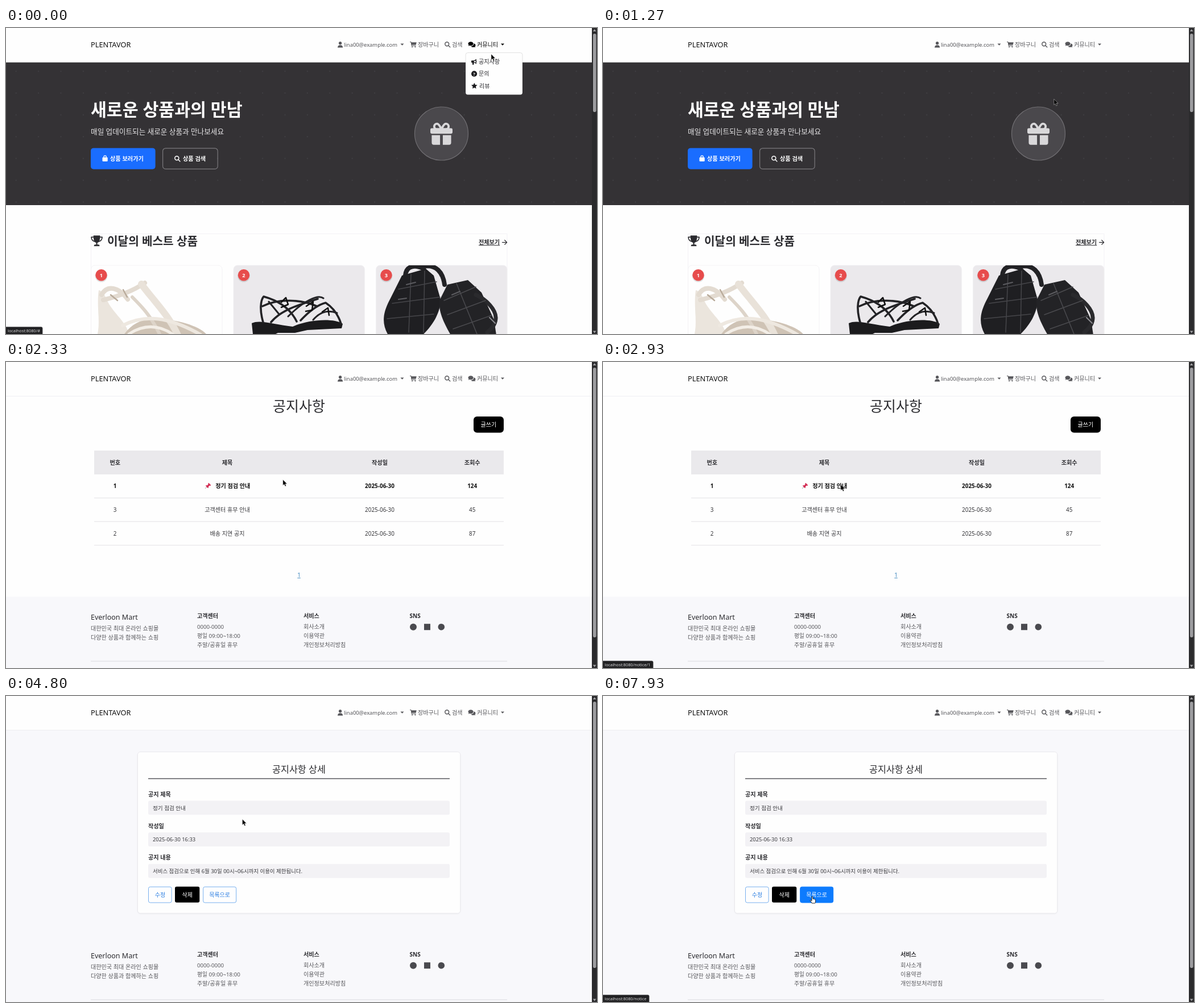
These frames come from a looping animation (1039 by 539 pixels, 8000 ms). An HTML page:

```html
<!DOCTYPE html>
<html lang="ko">
<head>
<meta charset="utf-8">
<title>Shop notices</title>
<style>
html, body { margin: 0; width: 100%; height: 100%; overflow: hidden; background: #fff; }
svg { display: block; width: 1039px; height: 539px; }
text { font-family: "Noto Sans", "Noto Sans CJK KR", "Noto Sans CJK JP", sans-serif; white-space: pre; }
</style>
</head>
<body>
<svg id="stage" viewBox="0 0 1039 539" xmlns="http://www.w3.org/2000/svg"></svg>
<script>
const INK = '#2b2b2f', GREY = '#57575b', BLUE = '#2a7de1';

// y is the visual middle of the line
const text = (x, y, s, size = 10.1, fill = GREY, weight = 400, anchor = 'start', more = '') =>
  `<text x="${x}" y="${(y + size * .385).toFixed(2)}" font-size="${size}" fill="${fill}" font-weight="${weight}" text-anchor="${anchor}" ${more}>${s}</text>`;
const mid = (x, y, s, size, fill, weight, more) => text(x, y, s, size, fill, weight, 'middle', more);
const rect = (x, y, w, h, fill, r = 0, more = '') =>
  `<rect x="${x}" y="${y}" width="${w}" height="${h}" rx="${r}" fill="${fill}" ${more}/>`;
const disc = (x, y, r, fill, more = '') => `<circle cx="${x}" cy="${y}" r="${r}" fill="${fill}" ${more}/>`;
const path = (d, fill, more = '') => `<path d="${d}" fill="${fill}" ${more}/>`;
const line = (d, color, w, more = '') =>
  path(d, 'none', `stroke="${color}" stroke-width="${w}" stroke-linecap="round" stroke-linejoin="round" ${more}`);
const group = (id, body, more = '') => `<g id="${id}" ${more}>${body}</g>`;

// icons live in a box 16 units high
const shapes = {
  user: c => disc(7, 4, 4, c) + path('M0 16C0 12 2.5 9.5 5.5 9.5H8.5C11.5 9.5 14 12 14 16Z', c),
  cart: c => line('M.7 1H3L5 11.3H15.5', c, 1.6) + path('M3.2 2H17.8L16 9H4.6Z', c) + disc(6.2, 14.4, 1.6, c) + disc(14.2, 14.4, 1.6, c),
  search: c => line('M1.2 6.5A5.3 5.3 0 1 1 11.8 6.5A5.3 5.3 0 1 1 1.2 6.5M10.6 10.6L15 15', c, 2.2),
  chat: c => path('M7 1C11 1 14 3.3 14 6.3S11 11.6 7 11.6C5.8 11.6 4.7 11.4 3.8 11L.3 12.3L1.6 9.3C.6 8.5 0 7.5 0 6.3C0 3.3 3 1 7 1Z', c)
    + path('M15.2 5.5C18 6 20 7.9 20 10.3C20 11.5 19.4 12.5 18.5 13.4L19.8 16L16.3 15C13 16.2 9.3 15.4 7.8 13C12 13 15.6 10 15.2 5.5Z', c),
  bag: c => rect(0, 5, 14, 11, c, 2) + line('M3.6 7V4A3.4 3.4 0 0 1 10.4 4V7', c, 1.7),
  gift: c => rect(0, 4, 16, 4, c, 1) + path('M1 9H7V16H2.5Q1 16 1 14.5ZM9 9H15V14.5Q15 16 13.5 16H9Z', c)
    + line('M8 4.8H4.8A2 2 0 0 1 4.8 .8C6.3 .8 7.2 3.2 8 4.8C8.8 3.2 9.7 .8 11.2 .8A2 2 0 0 1 11.2 4.8H8', c, 1.6),
  trophy: c => path('M4 0H14C14 6 13 10 9.9 11V13.6H12Q13.2 13.6 13.2 16H4.8Q4.8 13.6 6 13.6H8.1V11C5 10 4 6 4 0Z', c)
    + line('M4 2.4H.9C1 6 2.7 8.2 5.8 9M14 2.4H17.1C17 6 15.3 8.2 12.2 9', c, 1.4),
  horn: c => path('M0 5.5Q0 4 1.5 4H6C9 4 11.5 2.5 14 0V14C11.5 11.5 9 10 7 10V14.5Q7 16 5.5 16H4.5Q3 16 3 14.5V10H1.5Q0 10 0 8.5ZM14.8 5Q16.4 7 14.8 9Z', c)
    + path('M12 4V10C10.6 9.2 9.2 8.6 7.5 8.4V5.6C9.2 5.4 10.6 4.8 12 4Z', '#fff'),
  ask: c => disc(8, 8, 8, c) + mid(8, 8, '?', 12, '#fff', 700),
  star: c => path('M8 0L10.4 5.2L16 5.9L11.9 9.8L13 15.5L8 12.7L3 15.5L4.1 9.8L0 5.9L5.6 5.2Z', c)
};
const icon = (name, x, y, h, c) => `<g transform="translate(${x} ${y}) scale(${h / 16})">${shapes[name](c)}</g>`;
const caret = x => path(`M${x} 27.5H${x + 6}L${x + 3} 30.7Z`, 'currentColor');

const nav = text(149, 29.5, 'PLENTAVOR', 12.75, '#111')
  + group('links', icon('user', 583, 24, 10.5, 'currentColor') + text(594, 29.1, 'lina00@example.com', 9.4) + caret(693.5)
    + icon('cart', 710, 23.8, 10.6, 'currentColor') + text(724, 29, '장바구니')
    + icon('search', 771, 24, 10.4, 'currentColor') + text(784, 29, '검색'), `color="${GREY}"`)
  + group('talk', icon('chat', 812.5, 23.7, 10.4, 'currentColor') + text(828, 29, '커뮤니티', 10.1, 'currentColor') + caret(870));

const whiteShoe =
  path('M163 462C159 490 166 515 161 539H216C212 518 186 500 177 478C174 470 168 462 163 462Z', '#ebe5dd')
  + path('M208 539C222 520 240 512 262 512C300 513 338 524 352 539Z', '#cfc3b5')
  + line('M168 470C178 452 198 456 214 478M171 479C192 474 222 464 244 449', '#e3dbd1', 8)
  + line('M184 470L196 480M206 461L213 474', '#b9ab9b', 2.5)
  + line('M238 451C254 474 286 505 302 541', '#e9e2d9', 12)
  + line('M222 474C238 490 254 506 270 539', '#ddd4c9', 6)
  + line('M205 524C245 504 285 508 342 540', '#eee8e0', 6)
  + line('M216 539C242 522 268 522 294 540', '#f3eee7', 5);

const bowShoe =
  path('M432 520C446 513 470 522 504 526C530 514 575 510 592 521L590 529L530 532L508 537H478L474 539H434Z', '#1b1b1d')
  + line('M452 518C446 498 447 480 453 473C478 480 500 494 511 517M451 490C478 476 520 478 546 490', '#232326', 3.6)
  + line('M466 518C484 496 520 486 548 477M518 515C532 500 546 488 562 484C577 494 585 508 589 521', '#232326', 3.6)
  + line('M496 508C522 482 548 468 558 476M540 514C552 500 566 496 582 502M462 482L480 504', '#232326', 3)
  + line('M484 483L492 475L496 487L484 492M528 490L540 482L538 497L527 499M556 500L566 493L568 506', '#111', 2.5);

const bigShoes =
  line('M702 436C704 416 722 418 734 424M734 420C756 416 768 430 771 452', '#222225', 8)
  + path('M696 436L738 424L752 436L764 478C764 505 746 528 732 541H672C660 520 662 502 676 476Z', '#1f1f22')
  + path('M762 480L776 452L812 444L836 466L858 514L862 541H782C770 520 760 500 762 480Z', '#232326')
  + line('M826 470C844 478 862 496 861 512C860 524 852 531 846 536', '#2a2a2d', 7)
  + line('M690 460L757 447M679 485L763 474M670 512L752 504M712 434L708 536M736 428L734 536', '#46464a', 1.5)
  + line('M770 480L826 456M776 505L843 480M786 530L854 506M792 450L828 539', '#4a4a4e', 1.5)
  + line('M704 452L720 448M784 470L798 464M690 478L704 476', '#5c5c60', 2)
  + line('M850 510L860 520', '#8b8b90', 2);

const cards = [['#fefefe', whiteShoe], ['#ebe9ec', bowShoe], ['#ebe9ec', bigShoes]].map(([bg, shoe], i) => {
  const x = 149.5 + i * 250.5;
  return `<clipPath id="card${i}">${rect(x, 418, 230.5, 140, '#000', 7)}</clipPath>`
    + rect(x, 418, 230.5, 140, bg, 7, 'stroke="#f1f0f3" stroke-width=".8"')
    + `<g clip-path="url(#card${i})">${shoe}</g>`
    + disc(x + 18, 436.8, 10.8, '#000', 'opacity=".12"') + disc(x + 18, 435.3, 10.2, '#e74c4c')
    + mid(x + 18, 435.1, i + 1, 9.2, '#fff', 700);
}).join('');

const home = group('home', rect(0, 0, 1030, 539, '#fefefe')
  + `<pattern id="dots" x="-2" y="57" width="39.4" height="38.4" patternUnits="userSpaceOnUse">${disc(19.7, 19.2, .9, '#464449')}</pattern>`
  + rect(0, 60.6, 1030, 251.4, '#343235') + rect(0, 60.6, 1030, 251.4, 'url(#dots)')
  + text(149, 143.3, '새로운 상품과의 만남', 30.3, '#fff', 700)
  + text(149, 182.6, '매일 업데이트되는 새로운 상품과 만나보세요', 12.65, '#e6e5e7')
  + rect(149, 211.4, 113.6, 37.4, '#1a6dff', 5) + icon('bag', 169.5, 224.5, 10.5, '#fff') + text(183, 230.3, '상품 보러가기', 10.2, '#fff', 700)
  + rect(275.6, 211.8, 96.6, 36.6, 'none', 5, 'stroke="#7b797d" stroke-width="1.2"')
  + icon('search', 296, 225, 10.6, '#fff') + text(311, 230.3, '상품 검색', 10.2, '#fff', 700)
  + disc(765.5, 186, 47, '#4a484c', 'stroke="#706e72" stroke-width="1.2"') + icon('gift', 746, 166.7, 39, '#d9d8da')
  + rect(149.5, 362.5, 731.5, 200, 'none', 0, 'stroke="#f3f2f5"')
  + icon('trophy', 149, 365.5, 18.8, INK) + text(178, 375.4, '이달의 베스트 상품', 20.2, INK, 700)
  + text(831, 377.3, '전체보기', 10.1, INK, 700) + rect(831, 382.3, 37.2, 1, INK)
  + line('M872.5 377.6H880.3M876.8 373.8L880.6 377.6L876.8 381.4', INK, 1.3)
  + cards);

const footer = dy => `<g transform="translate(0 ${dy})">`
  + text(149, 449.1, 'Everloon Mart', 12.5, INK, 500)
  + text(149, 469, '대한민국 최대 온라인 쇼핑몰') + text(149, 485.3, '다양한 상품과 함께하는 쇼핑')
  + text(336, 447.3, '고객센터', 10.1, INK, 600) + text(336, 466.3, '0000-0000', 9.6)
  + text(336, 482.5, '평일 09:00~18:00', 9.75) + text(336, 498.5, '주말/공휴일 휴무')
  + text(523, 447.3, '서비스', 10.1, INK, 600)
  + ['회사소개', '이용약관', '개인정보처리방침'].map((s, i) => text(523, 466.4 + i * 16, s)).join('')
  + text(709.5, 447.3, 'SNS', 10.1, INK, 600)
  + disc(716, 466.7, 6, '#4a4a4f') + rect(735, 461.2, 11, 11, '#4a4a4f') + disc(765.3, 466.7, 5.8, '#4a4a4f')
  + rect(149, 526.5, 732, 1, '#dcdbe0') + '</g>';

const columns = [191.7, 389, 657, 819.7];
const row = (y, cells, fill, weight, size = 9.95, titleShift = 0) => cells.map((s, i) =>
  mid(columns[i] + (i === 1 ? titleShift : 0), y, s, i === 1 ? 10.1 : size, fill, weight)).join('');
const pin = line('M354 219.2L350.6 222.6', '#8d8d93', 1)
  + path('M356.3 212.9L360.4 217L359.2 218L357.6 217.7L356 219.4L355.9 221.5L355 222.2L350.9 218.1L351.7 217.2L353.8 217.2L355.5 215.6L355.2 214Z', '#d32d54');

const notice = group('notice', rect(0, 0, 1030, 539, '#fefefe') + rect(0, 59.7, 1030, .9, '#ededf0')
  + mid(515, 77, '공지사항', 25, INK, 500)
  + rect(822, 96, 53, 28.5, '#000', 6) + mid(848.4, 110.2, '글쓰기', 10.1, '#fff', 500)
  + rect(155, 156, 720, 42, '#eae9ec') + row(177, ['번호', '제목', '작성일', '조회수'], INK, 700, 10.1)
  + row(218.5, ['1', '정기 점검 안내', '2025-06-30', '124'], '#111', 700, 9.95, 9.8) + pin
  + row(260, ['3', '고객센터 휴무 안내', '2025-06-30', '45'], '#38383c', 400)
  + row(301.8, ['2', '배송 지연 공지', '2025-06-30', '87'], '#38383c', 400)
  + [239, 280.5, 322.3].map(y => rect(155, y, 720, 1, '#e3e2e6')).join('')
  + mid(515, 375.2, '1', 10, '#3d86bd') + rect(512.3, 380, 5.5, .9, '#3d86bd')
  + rect(0, 413.5, 1030, 126, '#f8f8fb') + footer(0));

const field = (y, label, value, size) => text(250, y, label, 10.1, INK, 700)
  + rect(250, y + 11.5, 530, 24.7, '#f3f2f5', 3) + text(258, y + 23.9, value, size, '#38383c');
const detail = group('detail', rect(0, 0, 1030, 539, '#f8f8fb') + rect(0, 0, 1030, 60, '#fefefe') + rect(0, 59.7, 1030, .9, '#ebebee')
  + rect(230, 98, 570, 287, '#000', 7, 'opacity=".025"') + rect(231.4, 98.4, 567.4, 284.4, '#fefefe', 5, 'stroke="#e8e7eb" stroke-width=".9"')
  + mid(515, 128.3, '공지사항 상세', 16.3, INK, 500) + rect(250, 144.8, 530, 1.5, '#55555a')
  + field(173, '공지 제목', '정기 점검 안내', 9.6)
  + field(228.8, '작성일', '2025-06-30 16:33', 9.35)
  + field(284.3, '공지 내용', '서비스 점검으로 인해 6월 30일 00시~06시까지 이용이 제한됩니다.', 9.46)
  + rect(250.5, 336.2, 40.6, 27.8, '#fefefe', 3, 'stroke="#78b0ef"') + mid(270.9, 350, '수정', 10, BLUE)
  + rect(297, 335.8, 43.3, 28, '#000', 3, 'id="del"') + mid(318.7, 350, '삭제', 10, '#fff')
  + rect(346.7, 336.2, 58, 27.8, '#fefefe', 3, 'id="back" stroke="#78b0ef"') + mid(375.6, 350, '목록으로', 10, BLUE, 400, 'id="backText"')
  + footer(8));

const menu = group('menu', rect(808, 43.5, 100, 74, '#fefefe', 4, 'stroke="#000" stroke-opacity=".14" stroke-width=".8"')
  + rect(808.6, 49, 98.8, 21, '#f6f6f8', 0, 'id="hover"')
  + icon('horn', 818, 54.6, 10.2, '#1c1c1f') + text(831, 59.6, '공지사항', 10.1, INK)
  + icon('ask', 818, 75.6, 10.2, '#1c1c1f') + text(831, 80.6, '문의', 10.1, INK)
  + icon('star', 818, 96.6, 10.6, '#1c1c1f') + text(832, 101.7, '리뷰', 10.1, INK));

const scrollbar = rect(1030, 0, 9, 539, '#2b2b2d') + rect(1032, 10, 5.6, 138, '#9d9da0', 2.8, 'id="thumb"')
  + path('M1031.8 6L1034.7 2L1037.6 6Z', '#a3a3a6') + path('M1031.8 533.5L1034.7 537.5L1037.6 533.5Z', '#a3a3a6');
const status = group('status', rect(-2, 526.8, 66, 14, '#202022', 2, 'id="bubble" stroke="#3a3a3d" stroke-width=".8"')
  + text(3, 533.4, '', 7.3, '#d8d8da', 400, 'start', 'id="url"'));
const cursor = group('cursor',
  path('M0 0V10.2L2.3 8.1L3.9 11.8L5.7 11L4.1 7.4H7.3Z', '#000', 'id="arrow" stroke="#fff" stroke-opacity=".7" stroke-width=".6"')
  + path('M-1 1Q-1 0 0 0T1 1V4.4Q2 3.8 2.7 4.7Q3.7 4.2 4.3 5.2Q5.6 5 5.6 6.4V8.8Q5.6 11 4.6 12H-.6Q-1.6 10.4-3.6 7.6Q-3.9 6.6-2.8 6.5L-1 7.8Z', '#fff', 'id="hand" stroke="#111" stroke-width=".9"'));

const $ = id => document.getElementById(id);
$('stage').innerHTML = home + notice + detail + nav + menu + scrollbar + status + cursor;

const LOOP = 8000;
// time, x, y of the pointer
const track = [
  [0, 853, 46], [70, 853, 46], [300, 848, 57], [470, 846, 61], [930, 846, 61], [1030, 838, 73],
  [1270, 793, 125], [1330, 781, 136], [1470, 766, 144], [1800, 766, 144], [2000, 690, 163],
  [2270, 510, 203], [2470, 434, 217], [2600, 419, 219], [2930, 418, 216], [3400, 418, 216],
  [3530, 415.5, 217], [5870, 415.5, 217], [6070, 382, 252], [6270, 300, 312], [6400, 277, 330],
  [6530, 335, 345], [6670, 343, 352], [6730, 350, 352], [7070, 368, 352], [7870, 368, 352], [7930, 368, 353], [LOOP, 368, 353]
];
// show from, gone from, fade in, fade out, path, bubble width
const hints = [
  [-99, 330, 1, 1, '#', 64], [330, 930, 1, 140, 'notice', 81],
  [2530, 3800, 130, 200, 'notice/1', 88], [6830, LOOP, 150, 1, 'notice', 81]
];

const ramp = (t, a, b) => Math.min(1, Math.max(0, (t - a) / (b - a)));
const mix = (a, b, k) => a + (b - a) * k;
const blend = (a, b, k) => `rgb(${a.map((v, i) => Math.round(mix(v, b[i], k)))})`;
const show = (id, on) => { $(id).style.display = on ? '' : 'none'; };

function draw(t) {
  const page = t < 1330 ? 'home' : t < 4600 ? 'notice' : 'detail';
  ['home', 'notice', 'detail'].forEach(p => show(p, p === page));
  $('thumb').setAttribute('height', { home: 138, notice: 475, detail: 469 }[page]);

  show('menu', t < 930);
  show('hover', t >= 230);
  $('talk').setAttribute('color', blend([0, 0, 0], [87, 87, 91], ramp(t, 600, 730)));

  const fill = ramp(t, 6700, 6850);
  $('back').setAttribute('fill', blend([254, 254, 254], [13, 123, 253], fill));
  $('back').setAttribute('stroke', blend([120, 176, 239], [13, 123, 253], fill));
  $('backText').setAttribute('fill', blend([42, 125, 225], [255, 255, 255], fill));
  $('del').setAttribute('fill', blend([0, 0, 0], [18, 18, 18], ramp(t, 6440, 6520) * (1 - fill)));

  const hint = hints.find(h => t >= h[0] && t < h[1] + h[3]);
  show('status', hint);
  if (hint) {
    const [a, b, fadeIn, fadeOut, tail, w] = hint;
    $('status').setAttribute('opacity', ramp(t, a, a + fadeIn) * (1 - ramp(t, b, b + fadeOut)));
    $('url').textContent = 'localhost:8080/' + tail;
    $('bubble').setAttribute('width', w + 2);
  }

  const n = track.findIndex(p => p[0] > t), [t0, x0, y0] = track[n - 1], [t1, x1, y1] = track[n];
  const k = ramp(t, t0, t1);
  $('cursor').setAttribute('transform', `translate(${mix(x0, x1, k)} ${mix(y0, y1, k)})`);
  const link = t >= 6460 || (t > 330 && t < 930);
  show('hand', link);
  show('arrow', !link);
}

const start = performance.now();
function tick() {
  draw((performance.now() - start) % LOOP);
  requestAnimationFrame(tick);
}
tick();
</script>
</body>
</html>
```
